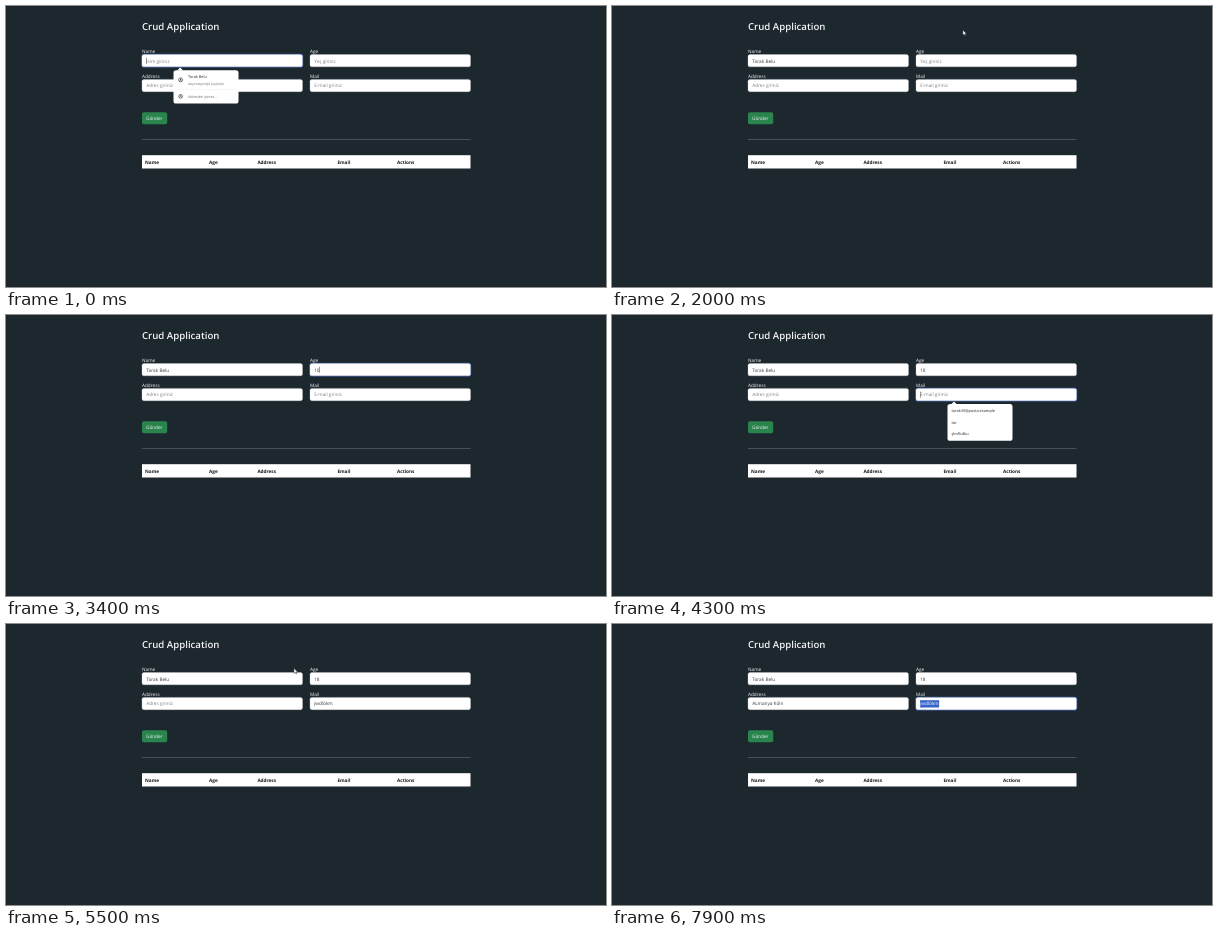
Write an HTML page that moves like this. It is 600 px wide and 281 px high and loops after 8000 ms.

```html
<!DOCTYPE html>
<html lang="tr">
<head>
<meta charset="utf-8">
<title>Crud Application</title>
<style>
  html, body { margin: 0; width: 100%; height: 100%; overflow: hidden; background: #1d272e; }
  svg { display: block; width: 600px; height: 281px; }
  text { font: 4.7px "Open Sans", "Noto Sans", sans-serif; fill: #f4f6f7; white-space: pre; text-rendering: geometricPrecision; }
  .title { font-size: 9.65px; font-weight: 600; }
  .head { font-weight: 700; fill: #15191c; }
  .value { fill: #343a40; }
  .hint { fill: #7b8186; }
  .small { font-size: 3.85px; fill: #25282b; }
  .tiny { font-size: 3.4px; fill: #666b70; }
  .box { fill: #fff; stroke: #ced4da; stroke-width: .3; }
  .ring { fill: none; stroke: #2c55a5; stroke-width: 1.1; }
  .icon { fill: none; stroke: #33373b; stroke-width: .6; }
</style>
</head>
<body>
<svg id="stage" viewBox="0 0 600 281">
  <rect width="600" height="281" fill="#1d272e"/>
  <text class="title" x="136" y="23.7">Crud Application</text>
  <g id="form"></g>
  <rect id="send" x="136" y="106.2" width="25.2" height="12" rx="1.9"/>
  <text x="140" y="114">Gönder</text>
  <rect x="136" y="133" width="328.5" height=".7" fill="#5a6268"/>
  <rect x="136" y="149.2" width="328.5" height="13.3" fill="#fff"/>
  <g id="heads"></g>

  <g id="nameList">
    <path d="M171.2 64.5 L174.2 61.5 L177.2 64.5Z" fill="#fff"/>
    <rect x="167.5" y="64.2" width="65" height="33.3" rx="2.6" fill="#fff"/>
    <circle class="icon" cx="174.6" cy="73.8" r="2"/>
    <circle cx="174.6" cy="73.2" r=".7" fill="#33373b"/>
    <path class="icon" d="M173.2 75.2 Q174.6 74 176 75.2"/>
    <text class="small" x="182" y="72.4">Torak Belu</text>
    <text class="tiny" x="182" y="78.6">dayındeyındjü kjnjtnjtn</text>
    <rect x="167.5" y="83.6" width="65" height=".3" fill="#dfe1e4"/>
    <circle class="icon" cx="174.6" cy="90.4" r="1.9"/>
    <path class="icon" d="M174.6 90.4 V88.6 M174.6 90.4 L173 91.4 M174.6 90.4 L176.2 91.4"/>
    <text class="tiny" x="182" y="91.9" style="font-size:3.7px">Adresleri yönet...</text>
  </g>

  <g id="mailList">
    <path d="M339 89.4 L342 86.4 L345 89.4Z" fill="#fff"/>
    <rect x="335.5" y="89" width="65" height="36.8" rx="2.6" fill="#fff"/>
    <text class="small" x="339.4" y="97.4">torak39@posta.example</text>
    <text class="small" x="339.4" y="108.8">tor</text>
    <text class="small" x="339.4" y="120.4">şlmflcdku</text>
  </g>

  <g id="alert">
    <path d="M228.3 0 H372.3 V27.4 Q372.3 30.2 369.5 30.2 H231.1 Q228.3 30.2 228.3 27.4Z" fill="#f4f4f6"/>
    <text id="message" class="small" x="235.3" y="4.6"></text>
    <rect x="340.8" y="10.6" width="25.4" height="13.6" rx="6.8" fill="none" stroke="#1746b0" stroke-width="1"/>
    <rect x="342.2" y="12" width="22.6" height="10.8" rx="5.4" fill="#1746b0"/>
    <text x="353.5" y="18.8" text-anchor="middle" style="font-size:3.8px">Tamam</text>
  </g>

  <g id="cursor" stroke="#20262b" stroke-width=".4" fill="#fff" stroke-linejoin="round">
    <path id="hand" d="M-.6 .3 Q0 -.8 .6 .3 V2.6 L2.6 3 Q3.3 3.2 3.2 4 L2.7 6.6 H-.6 L-2.3 4 Q-2.2 3 -1.3 3.5 L-.6 4Z"/>
    <path id="arrow" d="M0 0 V5 L1.2 3.9 L2 5.7 L2.8 5.4 L2 3.6 H3.6Z"/>
  </g>
</svg>
<script>
const LOOP = 8000;
const $ = id => document.getElementById(id);

function add(parent, tag, attrs, text = '') {
  const el = document.createElementNS('http://www.w3.org/2000/svg', tag);
  for (const key in attrs) el.setAttribute(key, attrs[key]);
  el.textContent = text;
  return parent.appendChild(el);
}

function makeField(label, hint, x, y) {
  const form = $('form');
  add(form, 'text', { x, y: y - 1.7 }, label);
  const ring = add(form, 'rect', { class: 'ring', x: x - .2, y: y - .2, width: 160.9, height: 12.7, rx: 2 });
  add(form, 'rect', { class: 'box', x, y, width: 160.5, height: 12.3, rx: 1.9 });
  const mark = add(form, 'rect', { x: x + 4, y: y + 2.8, height: 7.3, fill: '#3565c8' });
  const text = add(form, 'text', { x: x + 4.2, y: y + 8 });
  const caret = add(form, 'rect', { y: y + 3.2, width: .4, height: 6.2, fill: '#222' });
  return { hint, x, ring, mark, text, caret };
}

const fields = {
  name: makeField('Name', 'İsim giriniz', 136, 48.5),
  age: makeField('Age', 'Yaş giriniz', 304, 48.5),
  address: makeField('Address', 'Adres giriniz', 136, 73.4),
  mail: makeField('Mail', 'E-mail giriniz', 304, 73.4)
};

[['Name', 139], ['Age', 203], ['Address', 251.4], ['Email', 331.4], ['Actions', 391]]
  .forEach(([label, x]) => add($('heads'), 'text', { class: 'head', x, y: 157.6 }, label));

const typing = (start, step, field, text) =>
  [...text].map((_, i) => [start + i * step, field, text.slice(0, i + 1)]);

// time, focused field, its value
const edits = [
  [0, 'name', ''], [500, 'name', 'Torak Belu'], [1400, null],
  [2200, 'age', ''], ...typing(2300, 100, 'age', '10'), [2600, null],
  [3400, 'age', '10'], [3600, 'age', '1'], [3700, 'age', '18'],
  [4200, 'mail', ''], ...typing(4400, 50, 'mail', 'jwdlökm'), [4900, null],
  [5600, 'address', ''], ...typing(5700, 90, 'address', 'almanya'),
  [6700, 'address', ''], ...typing(6750, 55, 'address', 'ALmanya Köln'),
  [7500, 'mail', 'jwdlökm']
];

// opens, closes, message
const alerts = [
  [1365, 1900, 'Yaş Giriniz'],
  [2600, 3200, "Yaş 18'den Büyük Olmalı"],
  [4945, 5400, 'Adres Giriniz']
];

// each trip: time, x, y
const trips = [
  [[1200, 160, 60], [1360, 149, 116.5], [1650, 149, 116.5], [1830, 353, 18], [1950, 353, 18], [2150, 340, 56]],
  [[2450, 340, 58], [2590, 150, 115.5], [2900, 150, 115.5], [3090, 353, 18], [3200, 353, 18], [3350, 330, 56]],
  [[4700, 365, 88], [4860, 145, 112.5], [5100, 145, 112.5], [5300, 353, 18], [5420, 353, 18], [5600, 200, 80]]
];

const clamp = v => Math.max(0, Math.min(1, v));
const show = (el, on) => { el.style.display = on ? '' : 'none'; };

function pointer(t) {
  const trip = trips.find(p => t >= p[0][0] && t < p[p.length - 1][0]);
  if (!trip) return null;
  const i = trip.findIndex(p => p[0] > t);
  const [t0, x0, y0] = trip[i - 1], [t1, x1, y1] = trip[i];
  const k = (t - t0) / (t1 - t0), e = k * k * (3 - 2 * k);
  return { x: x0 + (x1 - x0) * e, y: y0 + (y1 - y0) * e };
}

function drawFields(t) {
  const values = {};
  let focus = null, last = 0;
  for (const [time, field, value] of edits) {
    if (time > t) break;
    focus = field;
    last = time;
    if (field) values[field] = value;
  }
  const picked = t < 7600 ? 0 : t < 7700 ? .6 : 1;
  for (const key in fields) {
    const f = fields[key], value = values[key] || '';
    const selected = key === 'mail' && picked > 0;
    f.text.textContent = value || f.hint;
    f.text.setAttribute('class', value ? 'value' : 'hint');
    f.text.style.fill = selected ? '#fff' : '';
    show(f.ring, key === focus);
    show(f.mark, selected);
    const width = value ? f.text.getComputedTextLength() : 0;
    if (selected) f.mark.setAttribute('width', (width + .6) * picked);
    f.caret.setAttribute('x', f.x + 4.2 + width);
    show(f.caret, key === focus && !selected && (t - last) % 1000 < 500);
  }
}

function draw(t) {
  drawFields(t);
  show($('nameList'), t < 500);
  show($('mailList'), t >= 4200 && t < 4400);

  const box = alerts.find(([open, close]) => t >= open && t < close + 80);
  show($('alert'), box);
  if (box) {
    $('message').textContent = box[2];
    $('alert').style.opacity = Math.min(clamp((t - box[0]) / 270), clamp(1 - (t - box[1]) / 80));
  }

  const p = pointer(t);
  const onSend = p && p.x > 136 && p.x < 161 && p.y > 106 && p.y < 118;
  $('send').setAttribute('fill', onSend ? '#216b41' : '#2a844e');
  show($('cursor'), p);
  if (p) $('cursor').setAttribute('transform', `translate(${p.x} ${p.y})`);
  show($('hand'), onSend);
  show($('arrow'), !onSend);
}

const start = performance.now();
function tick() {
  draw((performance.now() - start) % LOOP);
  requestAnimationFrame(tick);
}
tick();
</script>
</body>
</html>
```
